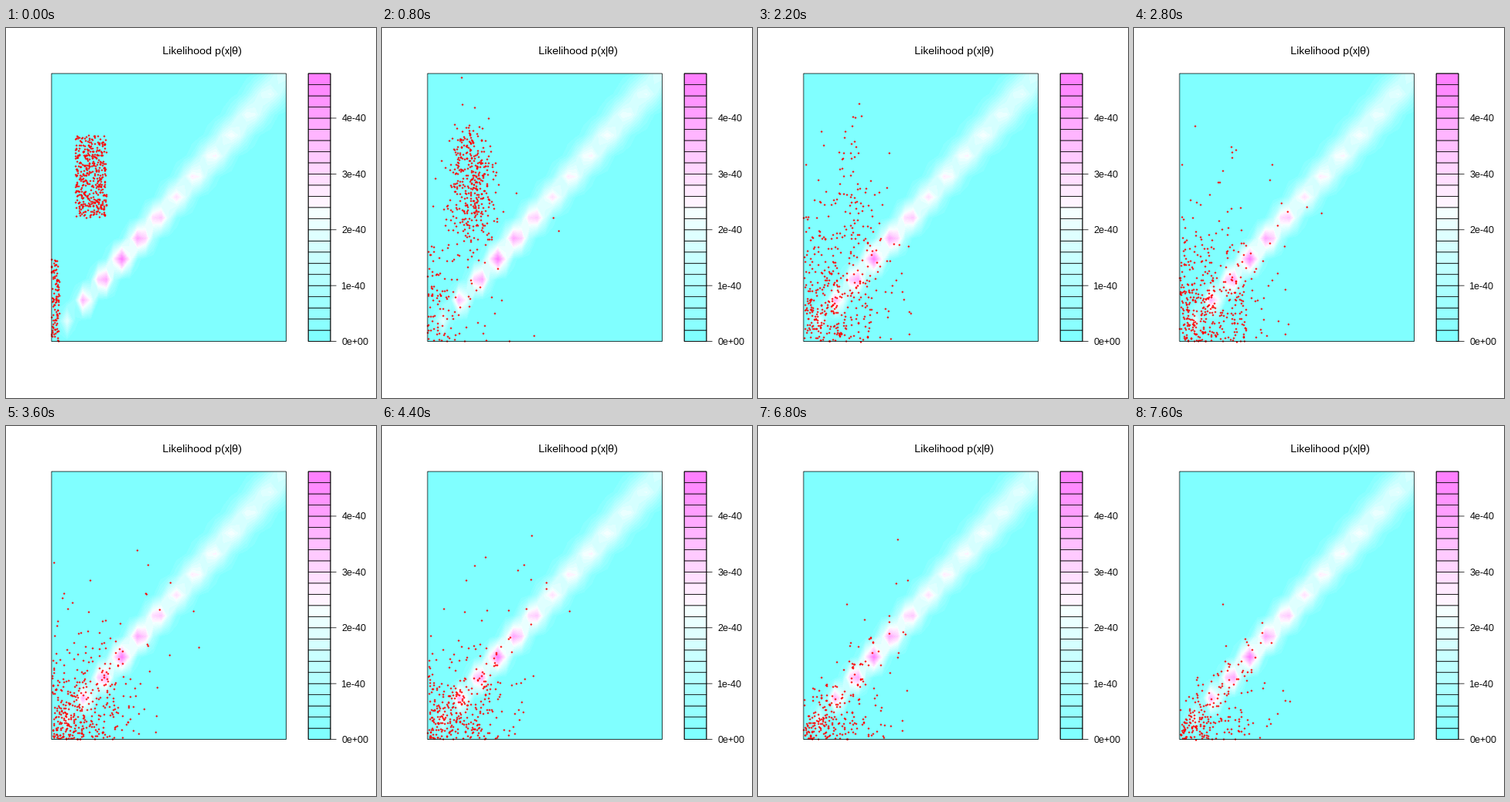
These frames come from a looping animation (480 by 480 pixels, 7800 ms). A matplotlib script:

```python
import colorsys

import matplotlib.pyplot as plt
import numpy as np
from matplotlib.animation import FuncAnimation
from matplotlib.patches import Rectangle

SIZE, DPI = 480, 72
FRAMES, INTERVAL = 39, 200
LEFT, RIGHT, TOP, BOTTOM = 59.04, 363.36, 59.04, 406.56
KEY_L, KEY_R = 392.16, 420.96
X_MAX, Y_MAX = 30, 13
BANDS = 24
LINE = dict(lw=0.75, snap=False)

# Whole-pixel glyph advances
plt.rcParams.update({"font.family": "Liberation Sans",
                     "text.hinting": "default", "text.hinting_factor": 1})


def to_px(x, y):
    return (LEFT + x * (RIGHT - LEFT) / X_MAX,
            BOTTOM - y * (BOTTOM - TOP) / Y_MAX)


def cyan_magenta(n):
    sat = np.linspace(0.5 / (n // 2), 0.5, n // 2)
    return ([colorsys.hsv_to_rgb(0.5, s, 1) for s in sat[::-1]]
            + [colorsys.hsv_to_rgb(5 / 6, s, 1) for s in sat])


def ridge_x(y):
    return 2.34 * y - 0.4


def likelihood(x, y):
    peak = np.interp(y, [0, 2, 4, 7, 13], [0, 4, 4.7, 2.85, 1.9])
    width = 0.45 + 0.11 * y
    return peak * np.exp(-0.5 * ((x - ridge_x(y)) / width) ** 2)


def settled(rng, n, t):
    """Draw n particles from the low-corner cloud at step t."""
    x = rng.gamma(1.25, np.interp(t, [0, 11, 38], [2.6, 4, 3.9]), n)
    x = np.minimum(x, rng.uniform(6, 14.5, n))
    height = np.interp(t, [4, 11, 18, 38], [3.2, 2.8, 1.4, 0.9])
    slope = np.interp(t, [4, 18, 38], [0, 0.07, 0.13])
    y = np.abs(rng.normal(0, height + slope * x))

    near = rng.random(n) < np.interp(t, [8, 18, 38], [0, 0.1, 0.25])
    y = np.where(near, (x + 0.4) / 2.34 + rng.normal(0, 0.6, n), y)

    far = rng.random(n) < np.interp(t, [8, 18, 38], [0, 0.05, 0.02])
    x = np.where(far, rng.normal(10.5, 3.5, n), x)
    y = np.where(far, rng.normal(6.3, 2, n), y)
    return np.abs(np.column_stack([x, y]))


def simulate(n_high=430, n_low=110, seed=7):
    """Two boxes of particles diffuse, settle low and thin out."""
    rng = np.random.default_rng(seed)
    n = n_high + n_low
    high = np.arange(n) < n_high
    col = high[:, None]
    pos = np.where(col, rng.uniform([3, 6], [7, 10], (n, 2)),
                   rng.uniform([0, 0], [1, 4], (n, 2)))
    leave = np.where(high, rng.normal(8.8, 3, n), rng.normal(6.5, 2, n))
    rank = rng.random(n)
    step = np.where(col, [0.45, 0.45], [1.3, 0.7])
    drift = np.where(col, [0.2, -0.1], 0)
    settled_yet = np.zeros(n, bool)
    steps = [pos]
    for t in range(1, FRAMES):
        pos = pos.copy()
        gone = leave < t
        walk = ~gone & (rng.random(n) < 0.75)
        jump = drift + step * rng.standard_t(3, (n, 2)) * 0.75
        pos[walk] = np.abs(pos[walk] + jump[walk])
        redraw = gone & (~settled_yet | (rng.random(n) < 0.25))
        pos[redraw] = settled(rng, redraw.sum(), t)
        pos = np.minimum(pos, [X_MAX, Y_MAX - 0.2])
        settled_yet |= gone
        steps.append(pos[rank > 0.6 * t / (FRAMES - 1)])
    return steps


def box(left, top, right, bottom, color="none"):
    ax.add_patch(Rectangle((left, top), right - left, bottom - top,
                           fc=color, ec="black", zorder=4, **LINE))


particles = simulate()
colors = cyan_magenta(BANDS)

fig = plt.figure(figsize=(SIZE / DPI, SIZE / DPI), dpi=DPI, facecolor="white")
ax = fig.add_axes([0, 0, 1, 1])
ax.set_xlim(0, SIZE)
ax.set_ylim(SIZE, 0)
ax.axis("off")

gx, gy = np.meshgrid(np.arange(X_MAX + 1), np.arange(Y_MAX + 1))
ax.contourf(*to_px(gx, gy), likelihood(gx, gy), colors=colors,
            levels=np.linspace(0, 4.8, BANDS + 1), antialiased=False)
box(LEFT, TOP, RIGHT, BOTTOM)

band = (BOTTOM - TOP) / BANDS
for i, color in enumerate(colors):
    y = BOTTOM - i * band
    box(KEY_L, y - band, KEY_R, y, color)
box(KEY_L, TOP, KEY_R, BOTTOM)
for i in range(5):
    y = BOTTOM - 5 * i * band
    ax.plot([KEY_R, KEY_R + 7.2], [y, y], color="black", **LINE)
    ax.text(435.36, y + 4.4, f"{i}e-40" if i else "0e+00", size=12,
            va="baseline")
ax.text(254.4, 34, "Likelihood p(x|θ)", size=14.4, ha="center",
        va="baseline")

dots = ax.scatter([], [], s=5.5, c="red", linewidths=0, zorder=3)


def update(t):
    dots.set_offsets(np.column_stack(to_px(*particles[t].T)))
    return (dots,)


anim = FuncAnimation(fig, update, frames=FRAMES, interval=INTERVAL,
                     repeat=True, repeat_delay=0)
plt.show()
```
